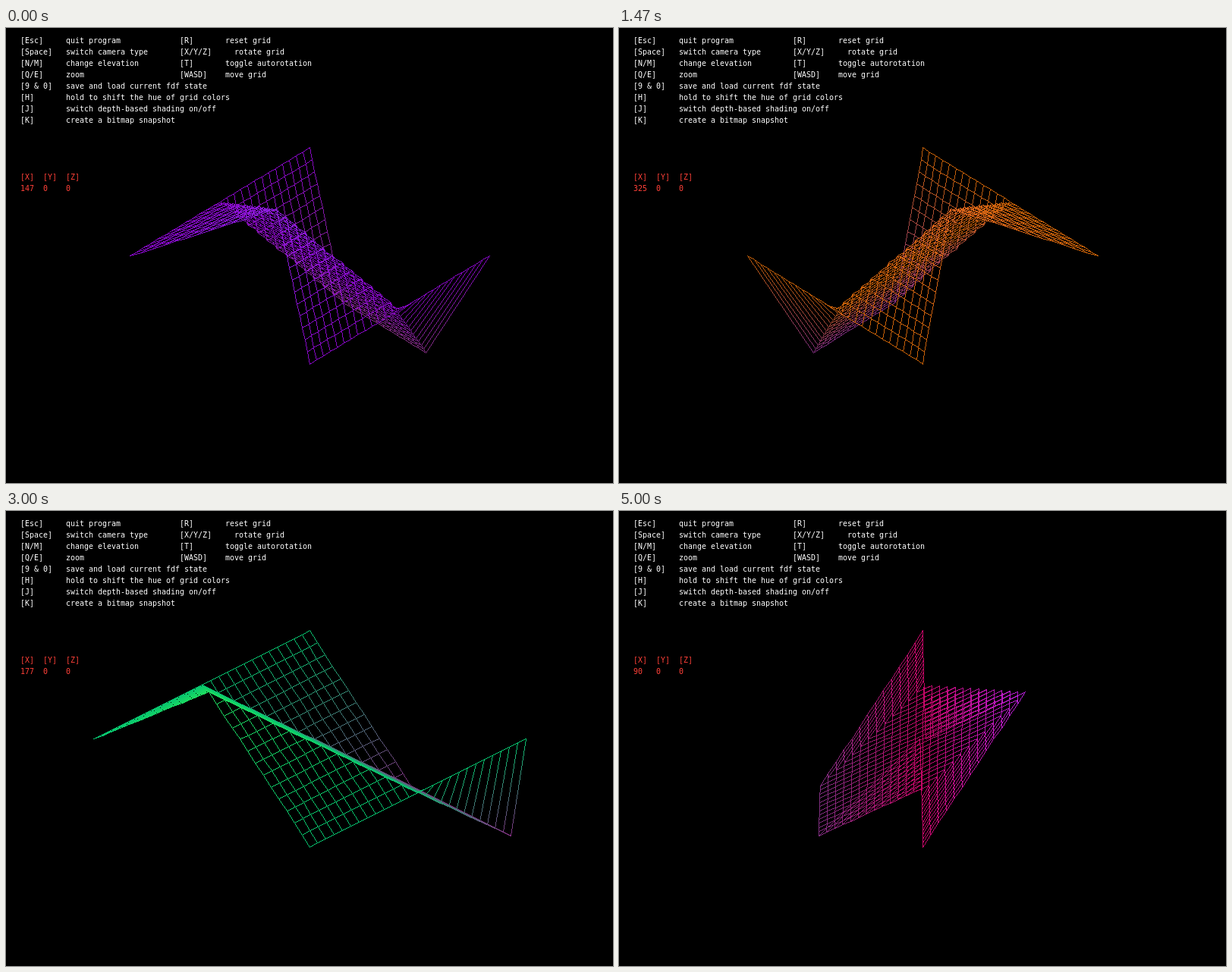
Recreate the animation shown at these times as an HTML page with a canvas. Size 800 by 600 pixels, loop 5070 ms.

```html
<!DOCTYPE html>
<html lang="en">
<head>
<meta charset="utf-8">
<title>Wireframe grid</title>
<style>
html, body { margin: 0; width: 100%; height: 100%; overflow: hidden; background: #000; }
canvas { position: absolute; left: 0; top: 0; display: block; }
pre {
  position: absolute; left: 19px; margin: 0; color: #fff;
  font: 9.97px/15px "DejaVu Sans Mono", monospace;
}
#help { top: 9px; }
#angles { top: 189px; color: #ff4038; }
</style>
</head>
<body>
<canvas id="stage" width="800" height="600"></canvas>
<pre id="help"></pre>
<pre id="angles"></pre>
<script>
const W = 800, H = 600;
const LOOP = 5070, FRAMES = 76;
const N = 26, HALF = N / 2;
const CELL_X = 11, CELL_Y = 5.5, RISE = 10.28;
const CX = W / 2, CY = H / 2;
const LOW = [128, 46, 128];

// step, angle, hue at level zero, hue at the peak
const KEYS = [
  [0, 147, 280, 274],
  [8, 213, 327, 318],
  [22, 325, 388, 382],
  [31, 407, 447, 432],
  [45, 537, 513, 500],
  [54, 618, 573, 552],
  [75, 810, 690, 648]
];

const HELP = [
  ["[Esc]", "quit program", "[R]", "reset grid"],
  ["[Space]", "switch camera type", "[X/Y/Z]", "  rotate grid"],
  ["[N/M]", "change elevation", "[T]", "toggle autorotation"],
  ["[Q/E]", "zoom", "[WASD]", "move grid"],
  ["[9 & 0]", "save and load current fdf state"],
  ["[H]", "hold to shift the hue of grid colors"],
  ["[J]", "switch depth-based shading on/off"],
  ["[K]", "create a bitmap snapshot"]
];
const COLUMNS = [10, 25, 10, 0];

const ctx = document.getElementById("stage").getContext("2d");
const image = ctx.createImageData(W, H);
const pixels = new Uint32Array(image.data.buffer);
const angles = document.getElementById("angles");
document.getElementById("help").textContent = HELP
  .map(row => row.map((s, k) => s.padEnd(COLUMNS[k])).join(""))
  .join("\n");

const mix = (a, b, t) => a + (b - a) * t;
const mixColor = (a, b, t) => a.map((c, k) => mix(c, b[k], t));

function hsl(h, s, l) {
  const a = s * Math.min(l, 1 - l);
  return [0, 8, 4].map(n => {
    const k = (n + h / 30) % 12;
    return 255 * (l - a * Math.max(-1, Math.min(k - 3, 9 - k, 1)));
  });
}

function stateAt(step) {
  let k = 0;
  while (k < KEYS.length - 2 && step >= KEYS[k + 1][0]) k++;
  const a = KEYS[k], b = KEYS[k + 1];
  const t = (step - a[0]) / (b[0] - a[0]);
  return {
    angle: Math.round(mix(a[1], b[1], t)),
    hue: mix(a[2], b[2], t),
    peakHue: mix(a[3], b[3], t)
  };
}

// A ridge on one half, a trough with a sheer end on the other
function level(i, j) {
  if (i === N) return 0;
  return j < HALF ? -Math.min(i, HALF - j) : Math.min(i, j - HALF, N - i);
}

function line(p, q) {
  const dx = Math.abs(q.x - p.x), dy = Math.abs(q.y - p.y);
  const sx = p.x < q.x ? 1 : -1, sy = p.y < q.y ? 1 : -1;
  const len = Math.max(dx, dy) || 1;
  let { x, y } = p, err = dx - dy;
  for (let n = 0; n <= len; n++) {
    const t = n / len;
    const r = mix(p.color[0], q.color[0], t);
    const g = mix(p.color[1], q.color[1], t);
    const b = mix(p.color[2], q.color[2], t);
    pixels[y * W + x] = 0xff000000 | (b << 16) | (g << 8) | r;
    const e = 2 * err;
    if (e > -dy) { err -= dy; x += sx; }
    if (e < dx) { err += dx; y += sy; }
  }
}

function draw(step) {
  const { angle, hue, peakHue } = stateAt(step);
  const turn = (angle - 0.84) * Math.PI / 180;
  const cos = Math.cos(turn), sin = Math.sin(turn);
  const base = hsl(hue, 0.93, 0.4), peak = hsl(peakHue, 0.75, 0.5);

  const palette = [];
  for (let z = -HALF; z <= HALF; z++) {
    palette.push(mixColor(base, z < 0 ? LOW : peak, Math.abs(z) / HALF));
  }
  // Offsets from the centre are cut to whole pixels
  const grid = [];
  for (let j = 0; j <= N; j++) {
    grid.push([]);
    for (let i = 0; i <= N; i++) {
      const z = level(i, j);
      grid[j].push({
        x: CX + Math.trunc((j - i) * CELL_X * cos + z * RISE * sin),
        y: CY + Math.trunc((i + j - N) * CELL_Y - z * RISE),
        color: palette[z + HALF]
      });
    }
  }

  pixels.fill(0xff000000);
  for (let j = 0; j <= N; j++) {
    for (let i = 0; i <= N; i++) {
      if (i < N) line(grid[j][i], grid[j][i + 1]);
      if (j < N) line(grid[j][i], grid[j + 1][i]);
    }
  }
  ctx.putImageData(image, 0, 0);
  angles.textContent = "[X]  [Y]  [Z]\n" + String(angle % 360).padEnd(5) + "0    0";
}

const start = performance.now();
let shown = -1;

function tick() {
  const t = (performance.now() - start) % LOOP;
  // 15 steps a second, with changes on whole hundredths
  const step = Math.min(FRAMES - 1, Math.floor((Math.floor(t / 10) * 10 + 5) * 0.015));
  if (step !== shown) {
    shown = step;
    draw(step);
  }
  requestAnimationFrame(tick);
}
tick();
</script>
</body>
</html>
```
